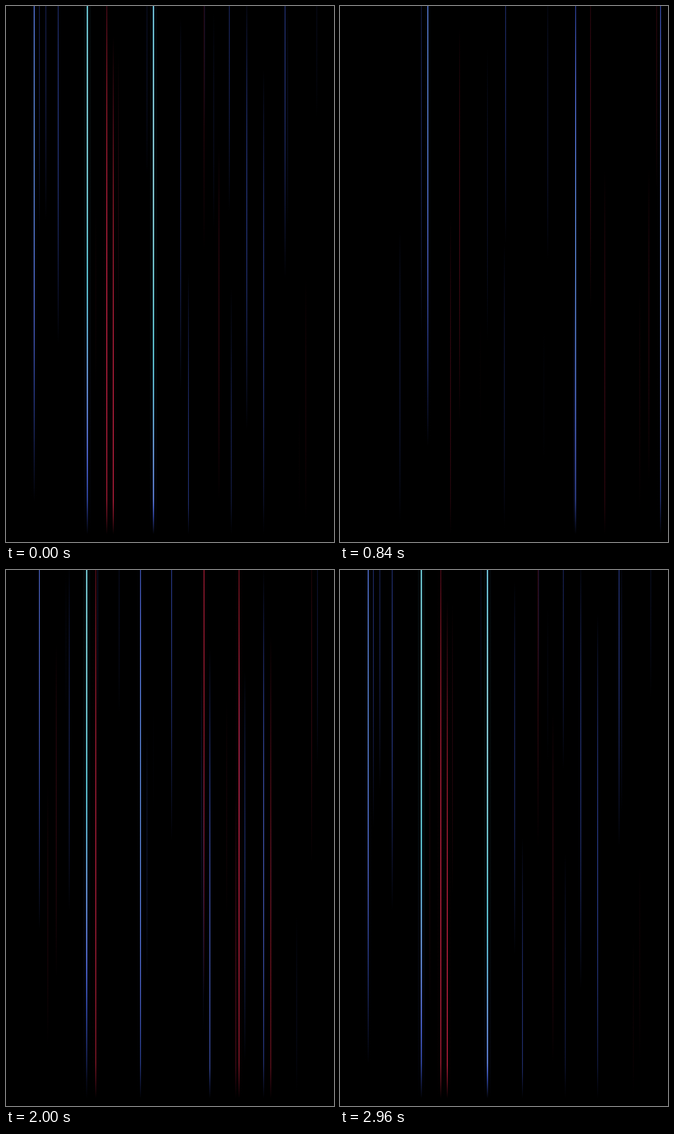
These frames come from a looping animation (506x824 px, 3000 ms). An HTML page with a canvas:

```html
<!DOCTYPE html>
<html lang="en">
<head>
<meta charset="utf-8">
<title>Light threads</title>
<style>
  html, body { margin: 0; width: 100%; height: 100%; overflow: hidden; background: #000; }
  canvas { display: block; width: 506px; height: 824px; }
</style>
</head>
<body>
<canvas id="stage" width="506" height="824"></canvas>
<script>
const WIDTH = 506, HEIGHT = 824, FLOOR = 812;
const LOOP = 3000, STEP = 40, STOPS = 30;
const ctx = document.getElementById('stage').getContext('2d');

// Evenly spaced colours from dark to full intensity
const cool = ['#000000', '#121a42', '#283a88', '#4a60c4', '#5c88ea', '#54b8ea', '#84e6f2'];
const hot = ['#000000', '#3a0812', '#781422', '#a81c38', '#dc3464'];

// Main beams: x, brightest time, brightest height
const bright = [[124, 1950, 90], [125, 0, 170], [227, 2940, 290]];
const blue = [
  [43, 50, 200], [51, 2350, 50], [135, 950, 120], [207, 2050, 350],
  [255, 1450, 20], [314, 1600, 600], [363, 870, 400], [397, 2420, 470],
  [494, 1000, 350]
];
const red = [
  [155, 0, 500], [165, 2950, 660], [305, 2280, 80],
  [408, 1520, 600], [138, 2200, 450], [359, 2080, 420]
];

let seed = 17;
const random = () => (seed = seed * 16807 % 2147483647) / 2147483647;
const between = (a, b) => a + (b - a) * random();

// Stronger streaks live longer and reach further.
const streak = (ramp, gain) => ([x, peak, mid]) => ({
  ramp, gain, x, peak, mid,
  life: 350 + 640 * gain,
  reach: 140 + 640 * gain
});

const dimStreaks = (ramp, count, low, high) => Array.from({ length: count }, () =>
  streak(ramp, between(low, high))([
    Math.round(between(30, 500)), between(0, LOOP), between(0, FLOOR)
  ]));

const streaks = [
  ...bright.map(streak(cool, .93)),
  ...blue.map(streak(cool, .66)),
  ...red.map(streak(hot, .74)),
  ...dimStreaks(cool, 36, .12, .34),
  ...dimStreaks(hot, 16, .15, .38)
];

const channels = hex => [1, 3, 5].map(i => parseInt(hex.slice(i, i + 2), 16));

function shade(ramp, level) {
  const p = Math.max(0, Math.min(1, level)) * (ramp.length - 1);
  const i = Math.min(ramp.length - 2, Math.floor(p));
  const from = channels(ramp[i]), to = channels(ramp[i + 1]);
  return `rgb(${from.map((c, n) => Math.round(c + (to[n] - c) * (p - i)))})`;
}

function drawStreak(s, time) {
  const gap = Math.abs(time - s.peak);
  const age = Math.min(gap, LOOP - gap) / s.life;
  const alive = 1 - age * age;
  if (alive <= 0) return;

  const half = s.reach * Math.sqrt(alive);
  const top = Math.max(0, s.mid - half);
  const bottom = Math.min(FLOOR, s.mid + half);
  if (bottom <= top) return;

  const fill = ctx.createLinearGradient(0, top, 0, bottom);
  for (let i = 0; i <= STOPS; i++) {
    const y = top + (bottom - top) * i / STOPS;
    const edge = Math.min(1, (FLOOR - y) / 45);
    const level = s.gain * (alive - ((y - s.mid) / s.reach) ** 2) * edge;
    fill.addColorStop(i / STOPS, shade(s.ramp, level));
  }
  ctx.fillStyle = fill;
  const bar = (spread, alpha) => {
    ctx.globalAlpha = alpha;
    ctx.fillRect(s.x - spread, top, 1 + 2 * spread, bottom - top);
  };
  const power = s.gain * alive;
  bar(0, 1);
  bar(1, .1 + Math.max(0, power - .55) * .8);
  if (power > .6) bar(5, (power - .6) * .12);
}

function render(time) {
  ctx.globalCompositeOperation = 'source-over';
  ctx.globalAlpha = 1;
  ctx.fillStyle = '#000';
  ctx.fillRect(0, 0, WIDTH, HEIGHT);
  ctx.globalCompositeOperation = 'lighter';
  for (const s of streaks) drawStreak(s, time);
}

const start = performance.now();
function tick() {
  const elapsed = (performance.now() - start) % LOOP;
  render(Math.floor(elapsed / STEP) * STEP);
  requestAnimationFrame(tick);
}
tick();
</script>
</body>
</html>
```
